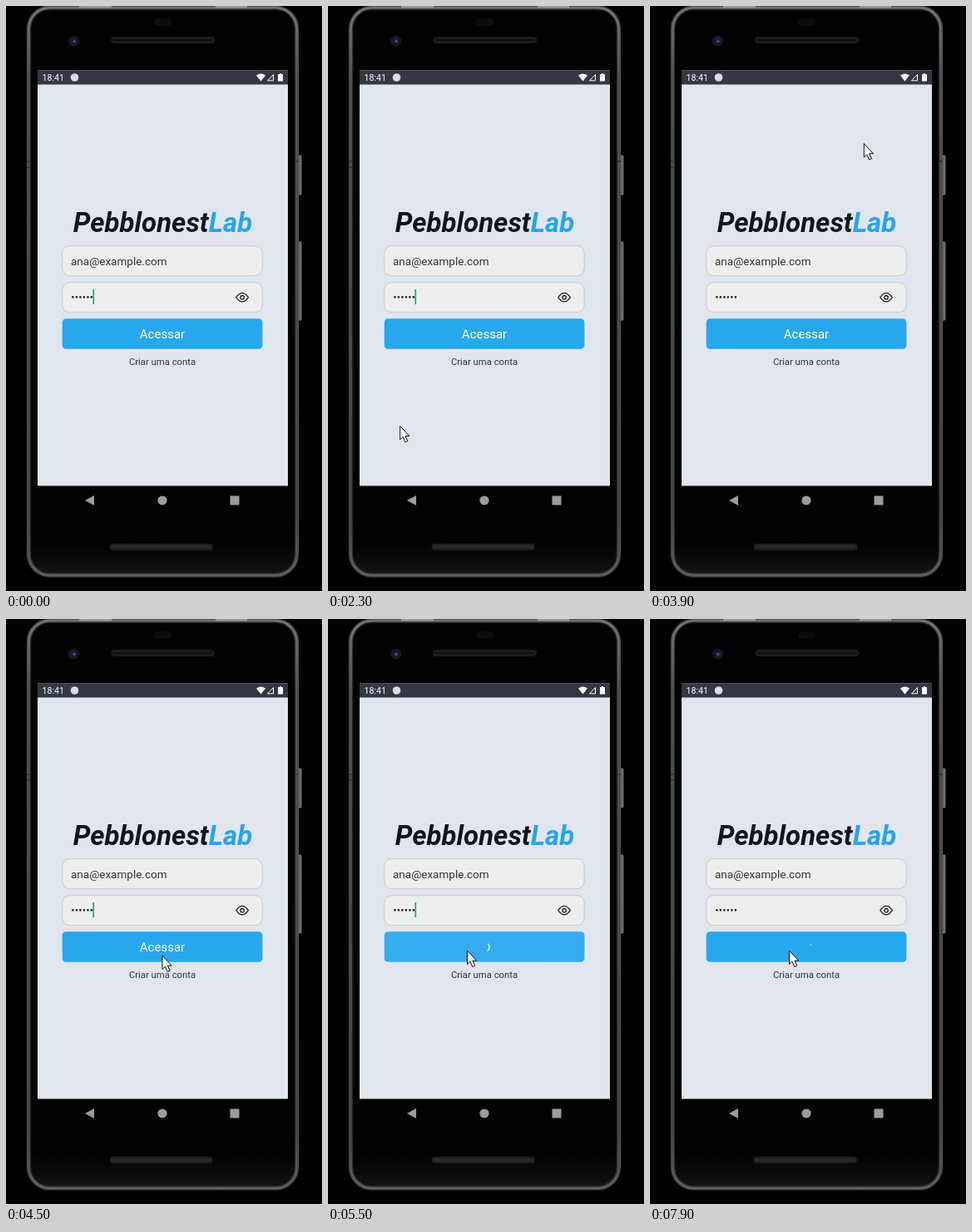
Recreate the animation shown at these times as an HTML page. Size 380x704 px, loop 8000 ms.

```html
<!DOCTYPE html>
<html lang="pt">
<head>
<meta charset="utf-8">
<title>Login</title>
<style>
  html, body { margin: 0; width: 100%; height: 100%; overflow: hidden; background: #000; }
  svg { display: block; width: 100%; height: 100%; font-family: Roboto, sans-serif; }
  .field { fill: #eee; stroke: #b9bcc3; stroke-width: .7; }
</style>
</head>
<body>
<svg viewBox="0 0 380 704">
  <defs>
    <linearGradient id="rim" x2="0" y2="1">
      <stop offset="0" stop-color="#999"/>
      <stop offset=".12" stop-color="#6c6c6c"/>
      <stop offset=".9" stop-color="#5c5c5c"/>
      <stop offset="1" stop-color="#777"/>
    </linearGradient>
    <linearGradient id="shell" x2="0" y2="1">
      <stop offset=".94" stop-color="#020202"/>
      <stop offset="1" stop-color="#141414"/>
    </linearGradient>
    <filter id="soft"><feGaussianBlur stdDeviation="1"/></filter>
  </defs>

  <!-- Phone -->
  <g fill="#666" stroke="#8a8a8a" stroke-width=".8">
    <rect x="350.5" y="180" width="4.5" height="47" rx="1"/>
    <rect x="350.5" y="284" width="4.5" height="94" rx="1"/>
  </g>
  <rect x="25" y="0" width="327" height="687" rx="27" fill="url(#shell)"/>
  <rect x="27.5" y="2" width="322" height="683" rx="25" fill="none" stroke="url(#rim)" stroke-width="3" filter="url(#soft)"/>
  <rect x="25.5" y=".5" width="326" height="686" rx="27" fill="none" stroke="#505050"/>
  <path d="M88 1H127M252 1H290" stroke="#999" stroke-width="2"/>
  <path d="M25 187H29M25 194H29M348 187H352" stroke="#222"/>
  <rect x="178" y="15" width="21" height="9" rx="4" fill="#0b0b10"/>
  <rect x="126.5" y="37" width="124.5" height="8" rx="4" fill="#1e1e1e"/>
  <rect x="128" y="39.5" width="121" height="3" rx="1.5" fill="#111"/>
  <rect x="124.5" y="647" width="124.5" height="8" rx="4" fill="#1e1e1e"/>
  <rect x="126" y="649.5" width="121" height="3" rx="1.5" fill="#2c2c2c"/>
  <circle cx="81.5" cy="42" r="6.5" fill="#17181f"/>
  <circle cx="81.5" cy="42" r="3.3" fill="#1b1e48"/>
  <circle cx="82" cy="42.5" r="1.3" fill="#5861b5"/>

  <!-- Screen and system bars -->
  <rect x="38" y="77.5" width="301" height="500" fill="#e1e6ee"/>
  <rect x="38" y="77.5" width="301" height="17" fill="#343844"/>
  <g fill="#fff">
    <text x="43.5" y="89.7" font-size="10.6">18:41</text>
    <circle cx="82.5" cy="86" r="4.8" fill="#dadce0"/>
    <path d="M301 83.5Q306.5 79.5 312 83.5L306.5 90.5Z"/>
    <path d="M314.5 89.8H321.5V82.5Z" fill="none" stroke="#fff"/>
    <path d="M327 82H329V81H331V82H333V90.5H327Z"/>
  </g>
  <g fill="#9c9c9c">
    <path d="M95 595L106 589V601Z"/>
    <circle cx="188" cy="595" r="5.6"/>
    <rect x="269.5" y="589.5" width="11" height="11"/>
  </g>

  <!-- Login form -->
  <text x="188.5" y="272" font-size="33" font-weight="700" font-style="italic" text-anchor="middle" fill="#11151b">Pebblonest<tspan fill="#27a5ea">Lab</tspan></text>
  <rect class="field" x="67.7" y="288.7" width="240.5" height="36" rx="9"/>
  <rect class="field" x="67.7" y="332.7" width="240.5" height="36" rx="9"/>
  <text x="78" y="311.7" font-size="13.5" fill="#333">ana@example.com</text>
  <path d="M80.4 350.3H104" stroke="#222" stroke-width="2.7" stroke-linecap="round" stroke-dasharray="0 4.5"/>
  <rect id="caret" x="104.4" y="341" width="1.7" height="18" fill="#25a08c"/>
  <g fill="none" stroke="#222" stroke-width="1.3">
    <path d="M276.8 350.7Q284.1 340.2 291.4 350.7Q284.1 361.2 276.8 350.7Z"/>
    <circle cx="284.1" cy="350.7" r="2.2"/>
  </g>
  <g id="button">
    <rect x="67.7" y="376.2" width="240.7" height="36.5" rx="4.5" fill="#27a8ee"/>
    <text id="label" x="188" y="400.2" font-size="15" text-anchor="middle" fill="#fff">Acessar</text>
    <path id="spinner" fill="none" stroke="#fff" stroke-width="1.3"/>
  </g>
  <text x="188" y="431.8" font-size="11.3" text-anchor="middle" fill="#333">Criar uma conta</text>

  <path id="pointer" d="M0 0V16.5L3.5 13.2L6.2 19.5L9.2 18.2L6.4 12.2H11.2Z" fill="#fff" stroke="#111" stroke-linejoin="round"/>
</svg>
<script>
const LOOP = 8000, STEP = 100;
const [caret, button, label, spinner, pointer] =
  ['caret', 'button', 'label', 'spinner', 'pointer'].map(id => document.getElementById(id));

// Pointer strokes as [time, x, y]; each is held until its end time.
const strokes = [
  { end: 3600, keys: [
    [1400, 8, 486], [1500, 45, 487], [1600, 69, 490.5], [1800, 88, 511],
    [2100, 88, 511], [2700, 84, 494], [2800, 84, 494],
    [2900, 122, 385], [3000, 184, 150], [3100, 221.5, 31], [3200, 221.5, 31], [3500, 227, 10]] },
  { end: LOOP, keys: [
    [3800, 252, 172], [3900, 257.3, 165.5], [4000, 257.3, 165.5], [4200, 263, 176],
    [4300, 252, 230], [4400, 222, 325], [4500, 188, 405], [4600, 170, 429], [4700, 167.5, 399]] }
];
const fade = [[4900, 1], [5000, .22], [5100, .2], [5300, .2], [5400, .65], [5500, .92], [5700, 1]];

function sample(keys, t) {
  const i = keys.findIndex(k => k[0] > t);
  if (i === 0) return keys[0].slice(1);
  if (i < 0) return keys[keys.length - 1].slice(1);
  const a = keys[i - 1], b = keys[i], p = (t - a[0]) / (b[0] - a[0]);
  return a.slice(1).map((v, n) => v + (b[n + 1] - v) * p);
}

const ease = p => (1 - Math.cos(Math.PI * Math.min(1, Math.max(0, p)))) / 2;

// Indeterminate ring: the head runs ahead, then the tail catches up.
function ringPath(t) {
  const cycles = (t - 7900) / 1333, turn = Math.floor(cycles), p = cycles - turn;
  const spin = .75 * turn + .25 * cycles + 2 * (t - 7900) / 4444 - .09;
  const tail = spin + .75 * ease(2 * p - 1);
  const head = Math.max(spin + .75 * ease(2 * p), tail + .03);
  const point = a => `${188 + 6 * Math.cos(a * 2 * Math.PI)} ${394.7 + 6 * Math.sin(a * 2 * Math.PI)}`;
  return `M${point(tail)}A6 6 0 ${head - tail > .5 ? 1 : 0} 1 ${point(head)}`;
}

const show = (el, on) => el.setAttribute('visibility', on ? 'visible' : 'hidden');

function draw(now) {
  const t = Math.floor(now % LOOP / STEP) * STEP;
  show(caret, Math.floor((t - 500) / 510) % 2 !== 0);
  show(label, t < 5000);
  show(spinner, t >= 5400);
  spinner.setAttribute('d', ringPath(t));
  button.setAttribute('opacity', sample(fade, t)[0]);

  const stroke = strokes.find(s => t >= s.keys[0][0] && t < s.end);
  show(pointer, stroke);
  if (stroke) pointer.setAttribute('transform', `translate(${sample(stroke.keys, t)})`);
}

const start = performance.now();
function tick() {
  draw(performance.now() - start);
  requestAnimationFrame(tick);
}
tick();
</script>
</body>
</html>
```
